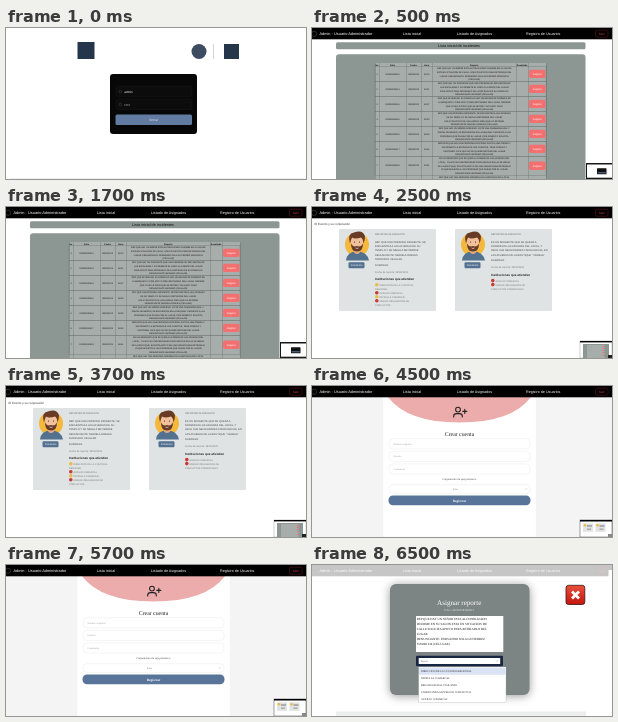
Animation of 300x151 px, one loop 8000 ms. Source, as an HTML page:

```html
<!DOCTYPE html>
<html lang="es">
<head>
<meta charset="utf-8">
<style>
html, body { margin: 0; width: 100%; height: 100%; overflow: hidden; background: #fff; }
svg { display: block; width: 100%; height: 100%; text-rendering: geometricPrecision; }
text { font-family: "Liberation Sans", Arial, sans-serif; }
.serif { font-family: "Liberation Serif", Times, serif; }
.mid { text-anchor: middle; }
.bold { font-weight: bold; }
.shadow { filter: drop-shadow(0 1px 5px #0006); }
</style>
</head>
<body>
<svg id="stage" viewBox="0 0 300 151"></svg>
<script>
const text = (x, y, size, str, fill = '#222', cls = '') =>
  `<text x="${x}" y="${y}" font-size="${size}" fill="${fill}" class="${cls}">${str}</text>`;
const rect = (x, y, w, h, fill, r = 0, more = '') =>
  `<rect x="${x}" y="${y}" width="${w}" height="${h}" rx="${r}" fill="${fill}" ${more}/>`;
const circle = (x, y, r, fill, more = '') => `<circle cx="${x}" cy="${y}" r="${r}" fill="${fill}" ${more}/>`;
const path = (d, fill, more = '') => `<path d="${d}" fill="${fill}" ${more}/>`;
const stroke = (color, w = 0.3) => `stroke="${color}" stroke-width="${w}"`;
const lines = (x, y, step, size, list, fill, cls) =>
  list.map((s, i) => text(x, y + i * step, size, s, fill, cls)).join('');

function header(back = '#000', ink = '#fff') {
  return rect(0, 0, 300, 11.3, back) +
    circle(2, 5.8, 2.6, 'none', stroke('#555', 0.5)) +
    text(7.5, 7, 3.9, 'Admin - Usuario Administrador', ink) +
    text(91, 7, 3.7, 'Lista inicial', ink) +
    text(145, 7, 3.7, 'Listado de Asignados', ink) +
    text(214, 7, 3.7, 'Registro de Usuarios', ink) +
    rect(283.5, 2.2, 12.5, 7, 'none', 1.4, stroke('#8c2024', 0.4)) +
    text(289.8, 6.8, 3, 'Salir', '#d43840', 'mid');
}

function login() {
  const field = (y, s) => rect(110, y, 76, 10.6, '#0c0c0c', 1.5, stroke('#242424')) +
    circle(114.3, y + 5.7, 1.3, 'none', stroke('#555', 0.4)) + text(118.3, y + 6.7, 3.1, s, '#fff');
  return rect(0, 0, 300, 151, '#fff') + rect(4, 150, 296, 1, '#eee') +
    rect(71.5, 14, 17, 17, '#26364a') + circle(193, 23.5, 7.5, '#3d4c60') +
    rect(207.3, 16, 0.4, 15, '#8b929a') + rect(218, 16, 15, 15, '#26364a') +
    rect(104, 46, 87, 60, '#070707', 3) +
    field(58, 'admin') + field(71, '•••••') +
    rect(109.5, 86.5, 76.5, 10.5, '#627ba0', 1.5) + text(147.7, 92.9, 3.1, 'Entrar', '#eef', 'mid');
}

function list() {
  const reports = [
    ['REP QUE HAY UN SEÑOR ESTA ALCOHOLIZADO DUERME EN SU SALON', 'ESTA EN SITUACION DE CALLE, SOLICITA APOYO PARA RETIRARLO DEL', 'LUGAR. DENUNCIANTE: FERNANDO SOLA GUTIERREZ 5550001234', '(CELULAR)'],
    ['REP QUE HAY UN INDIGENTE QUE UNA PERSONA SE ENCUENTRA EN', 'LAS ESCALERAS Y NO PERMITE EL PASO A LA GENTE DEL LUGAR', 'PIDE APOYO PARA RETIRARLO DE LA ENTRADA DE SU DOMICILIO', 'DENUNCIANTE ANONIMO (CELULAR)'],
    ['REP QUE AFUERA DE SU DOMICILIO HAY UN INDIGENTE DORMIDO EN', 'LA BANQUETA Y PIDE APOYO PARA RETIRARLO DEL LUGAR. REFIERE', 'QUE YA SE LE PIDIO QUE SE RETIRE Y NO HACE CASO', 'DENUNCIANTE ANONIMO (CELULAR)'],
    ['REP QUE UNA PERSONA INDIGENTE, SE ENCUENTRA A LAS AFUERAS', 'DE SU TEMPLO Y SE NIEGA A RETIRARSE DEL LUGAR', 'SOLICITA APOYO DE UNA UNIDAD PARA QUE LO RETIREN', 'DENUNCIANTE: MARIELA ROBLES (CELULAR)'],
    ['REP QUE HAY UN SEÑOR AGRESIVO, VISTE UNA CHAMARRA AZUL Y', 'PANTALON NEGRO, SE ENCUENTRA EN LA ESQUINA Y MOLESTA A LAS', 'PERSONAS QUE PASAN POR EL LUGAR, PIDE DINERO Y SOLICITA', 'DENUNCIANTE ANONIMO (CELULAR)'],
    ['REPORTA QUE HAY UNA PERSONA ACOSTADA JUNTO A UNA TIENDA Y', 'NO PERMITE LA ENTRADA DE LOS CLIENTES, TRAE COBIJAS Y', 'CARTONES. DICE QUE NO SE QUIERE RETIRAR DEL LUGAR', 'DENUNCIANTE ANONIMO (CELULAR)'],
    ['ES UN INDIGENTE QUE SE QUEDA A DORMIR EN LAS AFUERAS DEL', 'LOCAL, Y HACE SUS NECESIDADES FISIOLOGICAS EN LAS AFUERAS', 'DE LA BOUTIQUE, SOLICITA APOYO DE UNA UNIDAD PARA RETIRARLO', 'YA QUE MOLESTA A LAS PERSONAS QUE PASAN POR EL LUGAR', 'DENUNCIANTE ANONIMO (CELULAR)']
  ];
  const labels = ['No.', 'Folio', 'Fecha', 'Hora', 'Reporte', 'Resultado', ''];
  const cols = [63, 67, 94, 109, 120.5, 204, 216.3, 234];
  const center = i => (cols[i] + cols[i + 1]) / 2;
  const grid = stroke('#5d6562', 0.3);
  const step = 3.75;
  let out = rect(0, 0, 300, 151, '#fff') + header() +
    rect(24, 14.3, 249.5, 7, '#8c9693', 1.5) + text(147, 19, 3.8, 'Lista inicial de incidentes', '#111', 'mid') +
    rect(24, 26.3, 249.5, 130, '#8c9693', 3) + rect(63, 35, 171, 116, '#a6adab');
  labels.forEach((s, i) => out += text(center(i), 37.6, 2.2, s, '#111', 'mid bold'));
  let y = 38.4;
  reports.forEach((row, i) => {
    const h = row.length * step, mid = y + h / 2;
    const cells = [i + 1, '2303280004' + (12 + i), '28/03/2023', '08:' + (15 + i * 6)];
    out += rect(63, y, 171, h, 'none', 0, grid) + lines(center(4), y + 2.7, step, 2.15, row, '#111', 'mid') +
      cells.map((s, c) => text(center(c), mid + 0.7, 2.15, s, '#111', 'mid')).join('') +
      rect(217, mid - 4.2, 16.5, 8.4, '#f2706f', 1.7) +
      text(225.2, mid + 0.9, 2.7, 'Asignar', '#fff', 'mid');
    y += h;
  });
  out += text(center(4), y + 2.7, 2.15, 'REP QUE HAY UNA PERSONA DORMIDA EN LA ENTRADA DEL LOCAL', '#111', 'mid');
  cols.forEach(x => out += rect(x, 35, 0.3, 116, '#5d6562'));
  return out + rect(274, 135, 26, 16, '#181818') + rect(275, 136.5, 25, 13.2, '#fff') +
    rect(285, 140.3, 9.5, 6, '#111', 0.5) + rect(285.7, 144.3, 8.1, 1, '#627ba0');
}

function avatar(x) {
  return `<g transform="translate(${x} 23.5)">` +
    circle(12, 14, 12, '#f3b83c') +
    path('M1 30Q2 21 12 21T24 30Z', '#52728f') +
    path('M9 17h6v5q-3 3-6 0Z', '#e5a883') +
    path('M6 9Q6 4 12 4T18 9V14Q17 20 12 20T6 14Z', '#f2c09b') +
    path('M5 13Q2 3 9 2Q18-1 20 6Q20 10 18.5 13Q18 8 16 7Q10 9 7 7Q6 9 5 13Z', '#673b25') +
    path('M6 13Q8 17 12 15.5Q16 17 18 13Q18 21 12 21T6 13Z', '#673b25') +
    circle(9.5, 11.5, 0.6, '#222') + circle(14.5, 11.5, 0.6, '#222') +
    path('M10.5 17.5q1.5 1 3 0', 'none', stroke('#fff', 0.6)) + '</g>';
}

function card(x, desc, items) {
  const tx = x + 36, grey = '#777';
  const y = 36 + desc.length * 4.2;
  return rect(x, 22, 97, 82, '#dfe3e3', 1) + avatar(x + 6) +
    rect(x + 9.5, 55.2, 16, 6, '#52708f', 1.2) + text(x + 17.5, 59.1, 2.6, 'Pendiente', '#fff', 'mid') +
    text(tx, 27.5, 2.4, 'REPORTE/FOLIO/EVENTO', '#666') +
    lines(tx, 36, 4.2, 2.6, desc, '#444') +
    text(tx, y + 1.5, 2.6, 'DURANGO', '#444') + text(tx, y + 8.5, 2.5, 'Fecha de reporte: 28/03/2023', grey) +
    text(tx, y + 16, 3.1, 'Instituciones que atienden', '#222', 'bold') +
    items.map(([s, color], i) => {
      const ly = y + 21.7 + i * 4;
      return (color ? circle(tx + 1.8, ly - 0.9, 1.8, color) : '') + text(tx + (color ? 4.4 : 0), ly, 2.4, s, grey);
    }).join('');
}

function cards() {
  const gold = '#e9bd45', red = '#c83a36';
  return rect(0, 0, 300, 151, '#fff') + header() + text(2.5, 18, 3, 'El Evento y su corporación', '#333') +
    card(27, ['REP QUE UNA PERSONA INDIGENTE, SE', 'ENCUENTRA A LAS AFUERAS DE SU', 'TEMPLO Y SE NIEGA A RETIRARSE', 'DENUNCIANTE: MARIELA ROBLES', '5550004321 CELULAR'],
      [['DIRECCION DE LA CUSTODIA', gold], ['REGIONAL'], ['AUXILIO COMARCAL', red], ['PATRULLA COMARCAL', gold], ['UNIDAD INDAGADORA DE', red], ['CONFLICTOS']]) +
    card(143, ['ES UN INDIGENTE QUE SE QUEDA A', 'DORMIR EN LAS AFUERAS DEL LOCAL, Y', 'HACE SUS NECESIDADES FISIOLOGICAS, EN', 'LAS AFUERAS DE LA BOUTIQUE " NUBELA"'],
      [['AUXILIO COMARCAL', red], ['UNIDAD INDAGADORA DE', red], ['CONFLICTOS COMARCALES']]) +
    rect(268, 134, 32, 17, '#fff', 0, stroke('#666')) + rect(268, 134, 32, 1.4, '#000') +
    rect(271, 137, 26, 14, '#8c9693') + rect(275, 138, 17.5, 13, '#a6adab') +
    [139, 141, 143, 145, 148].map(y => rect(290.7, y, 1.8, 1, '#f2706f')).join('') +
    rect(296, 148, 4, 3, '#222');
}

function signup() {
  const field = (y, s) => rect(77, y, 141, 10.2, '#fff', 4, stroke('#dcdcdc')) +
    text(81.5, y + 6, 2.5, s, '#999', 'serif');
  const mini = x => rect(x, 137.3, 10, 8.5, '#dfe3e3') + circle(x + 2, 139.3, 1.3, '#f3b83c') +
    rect(x + 4, 139, 5, 2, '#a9adad') + rect(x + 4, 142.5, 4, 1.5, '#b8a9a5');
  return rect(0, 0, 300, 151, '#f4f4f4') + rect(71, 10, 153, 141, '#fff', 0, stroke('#ededed')) +
    path('M76 11Q95 36.5 147.5 36.5T219 11Z', '#ecacab') + header() +
    `<g fill="none" stroke="#222" stroke-width="1.1" stroke-linecap="round">
      <circle cx="146" cy="23.6" r="2.4"/><path d="M141.7 31v-.8q0-2.6 2.8-2.6h3q2.8 0 2.8 2.6v.8M152.8 23.4v4M150.8 25.4h4"/></g>` +
    text(147.5, 50, 5.8, 'Crear cuenta', '#222', 'serif mid') +
    field(52.7, 'Nombre completo') + field(65.3, 'Usuario') + field(77.9, 'Contraseña') +
    text(147.5, 94, 2.7, 'Corporación a la que pertenece:', '#333', 'serif mid') +
    rect(77, 98.7, 141, 9, '#fff', 4, stroke('#dcdcdc')) +
    text(143.5, 104.2, 2.5, 'Selec', '#777', 'serif mid') + path('M213 102.5l1 1 1-1', 'none', stroke('#666')) +
    rect(76.5, 109.4, 142, 9.8, '#587499', 4.5) + text(147.5, 115.6, 3.4, 'Registrar', '#fff', 'serif mid bold') +
    rect(268, 134, 32, 17, '#fff', 0, stroke('#444', 0.5)) + rect(268, 134, 32, 1.5, '#000') +
    mini(271) + mini(283.5) + rect(296, 148, 4, 3, '#888');
}

function assign() {
  const options = ['DIRECCION DE LA CUSTODIA REGIONAL', 'PATRULLA COMARCAL', 'BRIGADA RURAL VIGILANTE', 'UNIDAD INDAGADORA DE CONFLICTOS', 'AUXILIO COMARCAL'];
  const red = '<linearGradient id="red" x2="0" y2="1"><stop stop-color="#e8503c"/><stop offset="1" stop-color="#c4150f"/></linearGradient>';
  return red + rect(0, 0, 300, 151, '#fff') +
    `<g opacity=".3">${header('#444')}</g>` + rect(296.5, 5, 3.5, 7, '#fff') +
    rect(24, 146.5, 250, 4.5, '#eceded') +
    rect(78, 19, 139.5, 111, '#7c8583', 6, 'class="shadow"') +
    text(147.2, 40, 7.1, 'Asignar reporte', '#fff', 'serif mid') +
    text(147.2, 45.7, 3, 'Folio: 20230328/000412', '#e5e8e7', 'serif mid') +
    rect(104, 51, 87.3, 36, '#fff', 0.6) +
    lines(104.7, 55, 5, 3.15, ['REP QUE HAY UN SEÑOR ESTA ALCOHOLIZADO', 'DUERME EN SU SALON ESTA EN SITUACION DE', 'CALLE SOLICITA APOYO PARA RETIRARLO DEL', 'LUGAR', 'DENUNCIANTE: FERNANDO SOLA GUTIERREZ', '5550001234 (CELULAR)'], '#111', 'serif') +
    rect(104, 90.7, 87, 10.6, '#182643', 1) + rect(106.7, 93, 81.5, 6, '#fff', 0.5) +
    text(108.7, 97, 2.6, 'Buscar', '#666', 'serif') + path('M184 95.5l1 1 1-1', 'none', stroke('#555')) +
    rect(106.7, 102, 87.3, 35.5, '#fff', 0, stroke('#aaa')) + rect(107, 102.8, 86.7, 7, '#dae3f4') +
    lines(109, 107.2, 7, 2.65, options, '#222', 'serif') +
    rect(254, 20.3, 18.8, 19.2, 'url(#red)', 2.5, stroke('#3a1512', 0.8)) +
    path('M260 26.5l7 7m0-7l-7 7', 'none', stroke('#fff', 2.8));
}

const stage = document.getElementById('stage');
stage.innerHTML = [login, list, cards, signup, assign].map(draw => `<g>${draw()}</g>`).join('');
const scenes = [...stage.children];
const starts = [0, 500, 2500, 4500, 6500];

function tick() {
  const t = performance.now() % 8000;
  const now = starts.filter(s => s <= t).length - 1;
  scenes.forEach((g, i) => g.style.display = i === now ? '' : 'none');
  requestAnimationFrame(tick);
}
tick();
</script>
</body>
</html>
```
